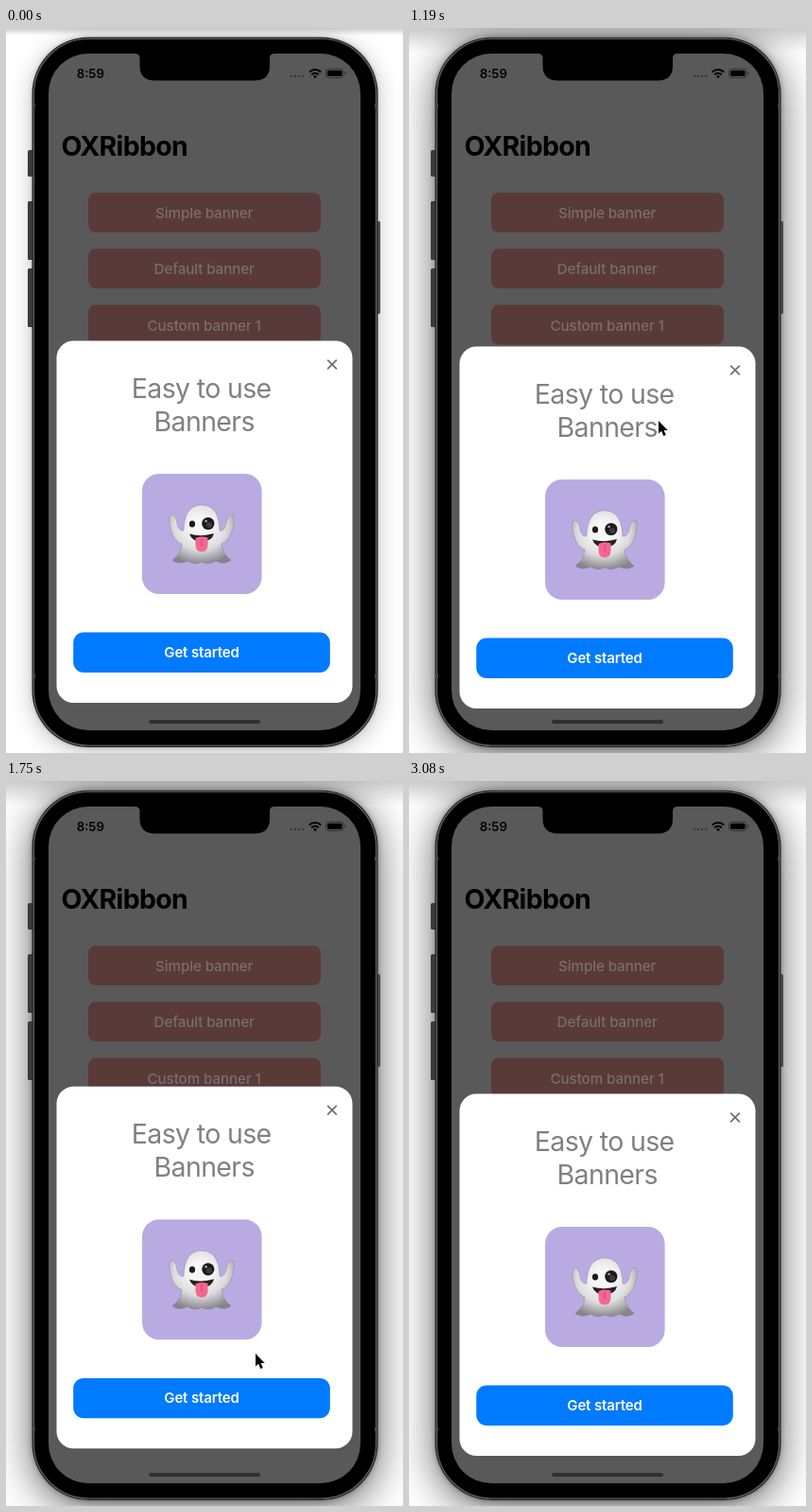
Animation, 420 px wide and 766 px high, one loop 3360 ms. Source, as an HTML page:

```html
<!DOCTYPE html>
<html lang="en">
<head>
<meta charset="utf-8">
<title>Banner demo</title>
<style>
  html, body { margin: 0; width: 100%; height: 100%; overflow: hidden; background: #fff; }
  #shadow {
    position: absolute; left: 28px; top: 9px; width: 365px; height: 751px;
    border-radius: 60px;
    box-shadow: 0 4px 24px rgba(0, 0, 0, .26), 0 0 4px rgba(0, 0, 0, .2);
  }
  #shadow.active { box-shadow: 0 8px 44px rgba(0, 0, 0, .62), 0 0 6px rgba(0, 0, 0, .35); }
  #shadow::before {
    content: ""; position: absolute; left: -28px; top: -9px; width: 420px; height: 8px;
    background: linear-gradient(rgba(0, 0, 0, .2), transparent);
  }
  #shadow.active::before { height: 26px; }
  svg { position: absolute; left: 0; top: 0; width: 420px; height: 766px; display: block; }
  text { font-family: Inter, Roboto, sans-serif; }
  .mid { text-anchor: middle; }
  .label { font-size: 15.2px; font-weight: 500; letter-spacing: -.1px; fill: #786e6e; }
  .head { font-size: 28.5px; letter-spacing: -.65px; fill: #808080; }
</style>
</head>
<body>
<div id="shadow"></div>
<svg viewBox="0 0 420 766">
  <defs>
    <clipPath id="screen"><rect x="45" y="27" width="330" height="715" rx="42"/></clipPath>
    <radialGradient id="sheet" cx=".48" cy=".36" r=".66">
      <stop offset=".25" stop-color="#f6f6f6"/>
      <stop offset=".62" stop-color="#dcdcde"/>
      <stop offset="1" stop-color="#85858a"/>
    </radialGradient>
  </defs>

  <!-- phone body -->
  <g fill="#3b3b3d">
    <rect x="23" y="129" width="7" height="28" rx="1.5"/>
    <rect x="23" y="183" width="7" height="62" rx="1.5"/>
    <rect x="23" y="254" width="7" height="62" rx="1.5"/>
    <rect x="391" y="204" width="5" height="98" rx="1.5" fill="#4c4c4e"/>
  </g>
  <rect x="27.5" y="9.5" width="366" height="750.5" rx="60" fill="#2b2b2d"/>
  <rect x="29.5" y="11.5" width="362" height="746.5" rx="58" fill="#000" stroke="#606062" stroke-width="1.2"/>
  <path d="M28 82h3M28 685h3M390 82h3M390 685h3" stroke="#454547" stroke-width="4"/>

  <g clip-path="url(#screen)">
    <rect x="45" y="27" width="330" height="715" fill="#595959"/>
    <text x="58.5" y="134.5" font-size="28.5" font-weight="700" letter-spacing="-.7">OXRibbon</text>
    <g id="list"></g>

    <text class="mid" x="89.3" y="52.8" font-size="13.2" font-weight="600">8:59</text>
    <path d="M302 51h14" stroke="#383838" stroke-width="2.4" stroke-linecap="round" stroke-dasharray="0 4"/>
    <g fill="none" stroke="#000" stroke-width="2">
      <path d="M320.8 46.6a8.6 8.6 0 0 1 12.4 0M323.2 49.2a5.4 5.4 0 0 1 7.6 0"/>
      <path d="M327 53.2l-2-2.2a2.8 2.8 0 0 1 4 0z" fill="#000" stroke="none"/>
    </g>
    <rect x="338.5" y="43.2" width="18.5" height="9.4" rx="2.8" fill="none" stroke="#333"/>
    <rect x="340" y="44.7" width="15.5" height="6.4" rx="1.5"/>
    <path d="M358.3 46.2v3.4q1.4-.4 1.4-1.7t-1.4-1.7z" fill="#333"/>

    <g id="card">
      <rect x="53.5" y="330.5" width="313" height="382.5" rx="18" fill="#fff"/>
      <path d="M340.6 351.1l8.8 8.8m0-8.8l-8.8 8.8" stroke="#6f6f72" stroke-width="1.7" stroke-linecap="round"/>
      <text class="mid head" x="206.7" y="391">Easy to use</text>
      <text class="mid head" x="209.7" y="426">Banners</text>
      <rect x="144" y="471" width="126.6" height="127" rx="18" fill="#b9abe2"/>

      <!-- ghost -->
      <path fill="url(#sheet)" stroke="#77777c" stroke-opacity=".45" stroke-width=".8" d="M207 504C195 504 188.500 513 188 531 185 532 182 529 181 524 180 518 178 514 175 514 172 515 172.500 521 174 528 176 538 181 544 186 545 185 553 182 558 176 562 179 566 187 566 192 563 197 566.500 202 566.500 207 564 212 566.500 217 566.500 222 563 227 566 235 566 238 562 232 558 229 553 228 545 233 544 238 538 240 528 241.500 521 242 515 239 514 236 514 234 518 233 524 232 529 229 532 226 531 225.500 513 219 504 207 504Z"/>
      <ellipse cx="197" cy="524" rx="3.1" ry="3.5" fill="#1c1a1c"/>
      <circle cx="213.8" cy="523.5" r="6.6" fill="#1c1a1c"/>
      <circle cx="215" cy="525" r="3" fill="#3c3a3d"/>
      <circle cx="211.6" cy="521" r="1.3" fill="#aaa"/>
      <path d="M194 534.5q13 3.5 26-.5-2 8.5-12.5 8.5-11 0-13.5-8z" fill="#262022"/>
      <path d="M200.5 539q6.500-2.500 13-.5v8q-.5 7-6.500 7t-6.500-7z" fill="#f5668f"/>
      <path d="M207 540v7" stroke="#d8447a" stroke-width="1.1" stroke-linecap="round"/>

      <rect x="71.200" y="638.600" width="271.600" height="42.400" rx="11" fill="#007aff"/>
      <text class="mid" x="207" y="665" font-size="15" font-weight="600" letter-spacing="-.15" fill="#fff">Get started</text>
    </g>
    <rect id="home" x="151" y="731" width="118" height="4" rx="2"/>
  </g>

  <!-- notch -->
  <path d="M136 26H284V27Q279 27 279 32V40Q279 55.500 263 55.500H157.500Q141.500 55.500 141.500 40V32Q141.500 27 136 27Z"/>

  <path id="cursor" d="M0 0V13.600L3.100 10.800 5.300 16 7.800 14.900 5.600 9.900H9.700Z" stroke="#fff" stroke-width="1.2" stroke-linejoin="round" paint-order="stroke"/>
</svg>
<script>
const LOOP = 3360, TICK = 70;
const PRESS = 1050, DRAG = 1108, DRAG_MS = 456, RELEASE = 1500, PEAK = 250;
const REST = { x: 264, y: 399 }, DROP = 206, SLOP = 10;
const $ = id => document.getElementById(id);
const clamp = v => Math.min(1, Math.max(0, v));
const ease = (t, start, length) => (1 - Math.cos(Math.PI * clamp((t - start) / length))) / 2;

$('list').innerHTML = ['Simple banner', 'Default banner', 'Custom banner 1', 'Custom banner 2', 'Custom banner 3']
  .map((label, i) => `<g transform="translate(0 ${i * 59.25})">
    <rect x="87" y="174" width="246" height="42" rx="8" fill="#593a38"/>
    <text class="mid label" x="209.700" y="201">${label}</text></g>`).join('');

const dragged = t => DROP * ease(t, DRAG, DRAG_MS);

// Follows the pointer past the slop, then springs back with a small overshoot.
function cardOffset(t) {
  const held = Math.max(0, dragged(Math.min(t, RELEASE)) - SLOP);
  if (t <= RELEASE) return held;
  const damping = .712, phase = Math.PI * (t - RELEASE) / PEAK;
  const k = damping / Math.sqrt(1 - damping * damping);
  return held * Math.exp(-k * phase) * (Math.cos(phase) + k * Math.sin(phase));
}

function pointer(t) {
  const enter = 1 - ease(t, -20, 680);
  const leave = ease(t, 2600, 480);
  return {
    x: REST.x - 50 * enter - 64 * leave,
    y: REST.y + 330 * enter + dragged(t) + 172 * leave
  };
}

function draw(now) {
  const t = Math.floor(now % LOOP / TICK) * TICK;
  const y = cardOffset(t), p = pointer(t);
  $('shadow').classList.toggle('active', t >= PRESS);
  $('card').setAttribute('transform', `translate(0 ${y.toFixed(2)})`);
  $('home').setAttribute('fill', y > 20 ? '#000' : '#303030');
  $('cursor').setAttribute('transform', `translate(${p.x.toFixed(2)} ${p.y.toFixed(2)})`);
  $('cursor').style.display = t >= TICK && t < 3080 ? '' : 'none';
}

let start;
function frame(now) {
  start ??= now;
  draw(now - start);
  requestAnimationFrame(frame);
}
draw(0);
requestAnimationFrame(frame);
</script>
</body>
</html>
```
